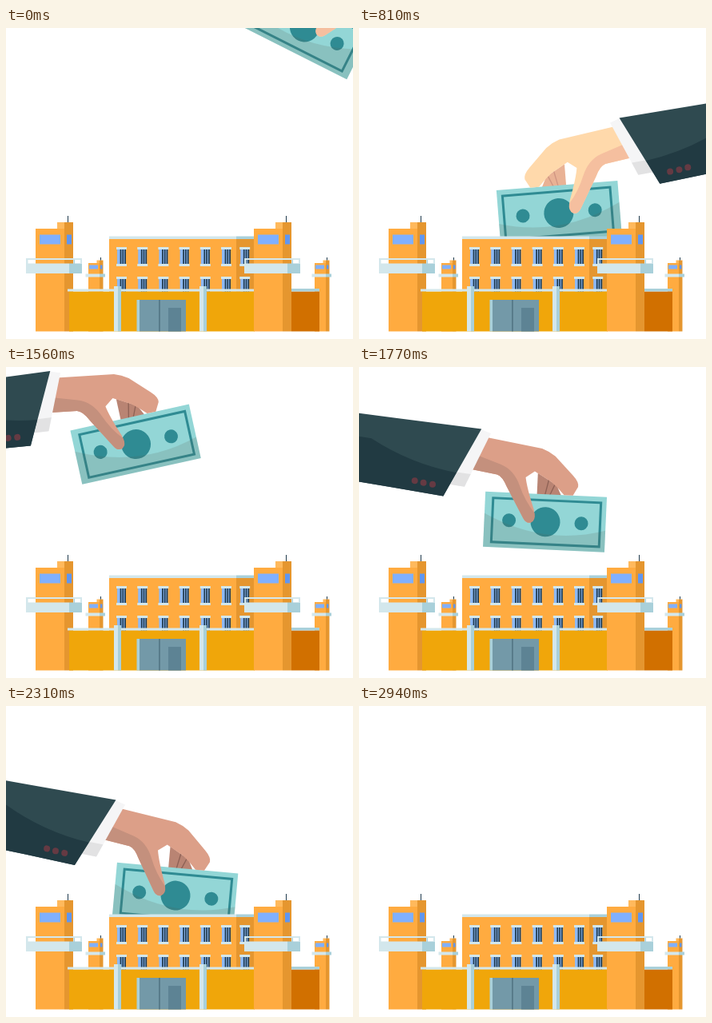
These frames come from a looping animation (434x389 px, 2970 ms). An HTML page:

```html
<!DOCTYPE html>
<html lang="en">
<head>
<meta charset="utf-8">
<title>Money and prison</title>
<style>
  html, body { margin: 0; width: 100%; height: 100%; overflow: hidden; background: #fff; }
  svg { display: block; }
  .light { --skin: #ffd9ab; --shade: #f5bf9f; --back: #e9b295; --line: #cf9582; }
  .dark { --skin: #dc9f88; --shade: #c4907d; --back: #b98473; --line: #8d6155; }
</style>
</head>
<body>
<svg width="434" height="389" viewBox="0 0 434 389">
  <defs>
    <g id="tower">
      <path fill="#ffab40" d="M37 251H73V379.500H37Z"/>
      <path fill="#ffb95c" d="M64 243H73V251H64Z"/>
      <path fill="#e5962f" d="M73 243H84V379.500H73Z"/>
      <path fill="#1f3a4d" d="M77 235h1v8h-1Z"/>
      <path fill="#80b0ff" d="M42 258.500H68V270.500H42Z"/>
      <path fill="#5f96f2" d="M76 258.500H82V270.500H76Z"/>
      <path fill="#d3e7ec" d="M25 288H79V290H27.500V294.500H79V307H25Z"/>
      <path fill="#a9d0da" d="M79 288H95V307H79V294.500H84.500V290H79ZM86 290V294.500H93V290Z" fill-rule="evenodd"/>
      <path fill="#d3e7ec" d="M79 288H95V290H79ZM93 288H95V295H93Z"/>
    </g>
    <g id="turret">
      <path fill="#ffab40" d="M103 294H117V379.500H103Z"/>
      <path fill="#ffb95c" d="M113.500 290.500H117V294H113.500Z"/>
      <path fill="#e5962f" d="M117 290.500H121.500V379.500H117Z"/>
      <path fill="#1f3a4d" d="M118 287h1v3.500h-1Z"/>
      <path fill="#80b0ff" d="M104 296.500H115V301.500H104Z"/>
      <path fill="#5f96f2" d="M118 296.500H120.500V301.500H118Z"/>
      <path fill="#d3e7ec" d="M99.500 307.500H117V311.500H99.500Z"/>
      <path fill="#a9d0da" d="M117 307.500H124V311.500H117Z"/>
    </g>
    <g id="window">
      <path fill="#8db9f5" d="M0 0H11V22H0Z"/>
      <path stroke="#1f3a4d" stroke-width="1.700" d="M4.500 2V21M7.300 2V21M10.100 2V21"/>
      <path fill="#d3e7ec" d="M-1 -1H12V2H-1ZM-1 20H12V23H-1Z"/>
    </g>
    <g id="pillar">
      <path fill="#d3e7ec" d="M135 323H140V379.500H135Z"/>
      <path fill="#a9d0da" d="M140 323H144V379.500H140Z"/>
    </g>
  </defs>

  <!-- Right-hand art; its pivot is the upper corner of the sleeve -->
  <g id="arm"><g transform="translate(-326 -65)">
    <path fill="var(--back)" d="M222 145L229 131L253 117V145Z"/>
    <path stroke="var(--line)" stroke-width="1.300" d="M231 130L237 144M239 125L243 144"/>
    <path fill="#93d6d6" d="M165.500 143H317.500V212H165.500Z"/>
    <path fill="none" stroke="#2f8b93" stroke-width="3" d="M172.500 150.500H307.500V205.500H172.500Z"/>
    <g fill="#2f8b93">
      <circle cx="196" cy="177.500" r="8.500"/>
      <circle cx="241" cy="177.500" r="18.500"/>
      <circle cx="286.500" cy="177.500" r="8.500"/>
    </g>
    <path fill="#5a5a50" opacity=".17" d="M165.500 185Q242 208 317.500 170V212H165.500Z"/>
    <path fill="var(--skin)" d="M320 75L249 86Q240 89 232 95L209 118Q201 126 202 132L208 143H219Q226 135 236 127L257 115L268 123Q266 136 256 163Q253 176 259 179Q265 181 269 174L291 136Q297 123 304 121L336 116Z"/>
    <path fill="var(--shade)" d="M330 98L336 116L304 121Q297 123 291 136L269 174Q265 181 259 179Q253 176 255 167Q268 152 275 134Q283 114 300 108Z"/>
    <path fill="#f5f5f6" d="M314 70L328 65L363 136L344 138Z"/>
    <path fill="#e2e2e3" d="M337 122L358 120L363 136L344 138Z"/>
    <path fill="#2f4a50" d="M326 65L434 56L734 31V106L434 143L370 151Z"/>
    <path fill="#213a42" d="M355 121Q412 113 463 83L734 50V106L434 143L370 151Z"/>
    <g fill="#653a43">
      <circle cx="384" cy="137" r="4"/>
      <circle cx="395.500" cy="135.500" r="4"/>
      <circle cx="406.500" cy="133.500" r="4"/>
    </g>
  </g></g>

  <g id="prison">
    <use href="#turret"/>
    <path fill="#ffab40" d="M129 264H288V330H129Z"/>
    <path fill="#e5962f" d="M288 264H311V330H288Z"/>
    <path fill="#d3e7ec" d="M129 260.500H288V264H129Z"/>
    <path fill="#a9d0da" d="M288 260.500H311V264H288Z"/>
    <g id="windows"></g>
    <use href="#tower"/>
    <path fill="#f0a60a" d="M79 329.500H311V379.500H79Z"/>
    <path fill="#d3e7ec" d="M77 326.500H311V329.500H77Z"/>
    <use href="#pillar"/>
    <use href="#pillar" x="107"/>
    <path fill="#a9d0da" d="M163.500 340H167V379.500H163.500Z"/>
    <path fill="#7399a8" d="M167 340H225V379.500H167Z"/>
    <path fill="#5d8394" d="M203 350H219V379.500H203Z"/>
    <path fill="#4f7180" d="M191.200 340h1.500v39.500h-1.500Z"/>
    <use href="#turret" x="283"/>
    <path fill="#d17000" d="M357 329.500H392V379.500H357Z"/>
    <path fill="#a9d0da" d="M357 326H392V329.500H357Z"/>
    <use href="#tower" x="273"/>
  </g>
</svg>
<script>
const LOOP = 2970, TURN = 1470;
const arm = document.getElementById('arm');

// time, x, y, angle: swing in past the rest pose, settle, lower, pull back
const poses = [
  [0, 175, -129, 26.9],
  [200, -30, 25, -4.8],
  [420, 0, 0, 0],
  [570, 0, 0, 0],
  [1110, -1, 106.4, -10.3],
  [1470, 290, 76, -10.3]
];

function poseAt(time) {
  const t = Math.min(time, TURN);
  const i = poses.findIndex(p => p[0] >= t) || 1;
  const a = poses[i - 1], b = poses[i];
  const k = (t - a[0]) / (b[0] - a[0]);
  return a.map((v, j) => v + (b[j] - v) * k);
}

function draw() {
  const t = performance.now() % LOOP;
  const left = t >= TURN;
  const [, x, y, angle] = poseAt(left ? t - TURN : t);
  const base = left ? 'translate(137 64) scale(-1 1)' : 'translate(326 65)';
  arm.setAttribute('class', left ? 'dark' : 'light');
  arm.setAttribute('transform', `${base} translate(${x} ${y}) rotate(${angle})`);
  requestAnimationFrame(draw);
}

let windows = '';
for (const y of [275, 312])
  for (let i = 0; i < 7; i++)
    windows += `<use href="#window" x="${(139 + i * 26.2 - (i > 5 ? 3 : 0)).toFixed(1)}" y="${y}"/>`;
document.getElementById('windows').innerHTML = windows;
draw();
</script>
</body>
</html>
```
